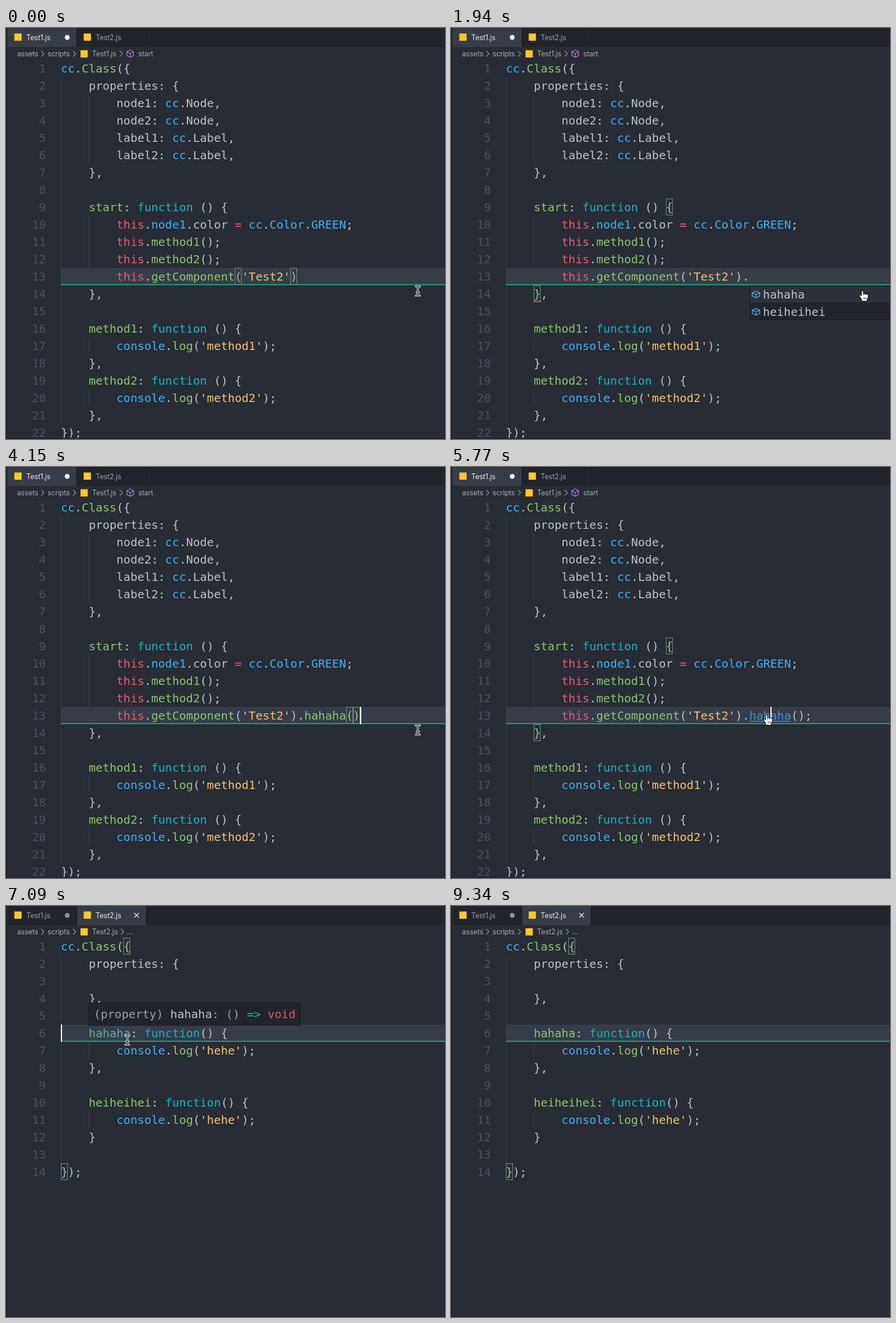
An HTML page with a canvas for the animation above (9.94 s loop, 760x711 px).

```html
<!DOCTYPE html>
<html lang="en">
<head>
<meta charset="utf-8">
<title>Go to definition</title>
<style>
html, body { margin: 0; width: 100%; height: 100%; overflow: hidden; background: #282c34; }
canvas { display: block; width: 760px; height: 711px; }
</style>
</head>
<body>
<canvas id="stage"></canvas>
<script>
const W = 760, H = 711, LOOP = 9940;
const canvas = document.getElementById('stage');
const ctx = canvas.getContext('2d');
const dpr = window.devicePixelRatio || 1;
canvas.width = W * dpr;
canvas.height = H * dpr;

const MONO = '20px "DejaVu Sans Mono", Menlo, monospace';
const UI = '12.5px Inter, sans-serif';
const X0 = 95, TOP = 55, ROW = 30;
ctx.font = MONO;
const CH = ctx.measureText('0').width;

const INK = {
  w: '#bcc0c7', b: '#3fb0f3', g: '#8cc570', t: '#12b5bf',
  p: '#ec5a70', y: '#f0c46f', l: '#3a91d4', d: '#9a9fa7', v: '#d9566c'
};

// Each token is a colour key followed by its text.
const log = s => `b        console|w.|glog|w(|y'${s}'|w);`;
const method = (name, gap) => `g    ${name}|w: |tfunction|w${gap}() {`;
const member = (name, type) => `w        ${name}: |bcc|w.${type},`;
const call = name => `p        this|w.|g${name}|w();`;
const HEAD = ['bcc|w.|gClass|w({', 'w    properties: {'];
const END = 'w    },';

const first = [
  ...HEAD,
  member('node1', 'Node'), member('node2', 'Node'),
  member('label1', 'Label'), member('label2', 'Label'),
  END, '',
  method('start', ' '),
  'p        this|w.|bnode1|w.color |p=|b cc|w.|bColor|w.|bGREEN|w;',
  call('method1'), call('method2'),
  "p        this|w.|ggetComponent|w(|y'Test2'|w)",
  END, '',
  method('method1', ' '), log('method1'), END,
  method('method2', ' '), log('method2'), END,
  'w});'
];
const second = [
  ...HEAD, '', END, '',
  method('hahaha', ''), log('hehe'), END, '',
  method('heiheihei', ''), log('hehe'), 'w    }', '',
  'w});'
];

// Step tracks: [start time, value]
const tail = [[0, ''], [300, '.'], [2230, '.h'], [3120, '.ha'], [3260, '.hahaha'],
  [4150, '.hahaha()'], [4440, '.hahaha();']];
const caret = [[0, -1], [300, 35], [900, -1], [1340, 35], [1940, -1], [2230, 36], [2680, -1],
  [3120, 37], [3260, 41], [3710, -1], [4150, 43], [4890, -1], [5480, 44], [5770, 38],
  [5920, 0], [6360, -1], [6800, 0], [7390, -1], [7840, 0], [8290, -1], [8890, 0], [9340, -1]];
const pairs = [[0, [[13, 25], [13, 33]]], [300, []], [450, [[9, 23], [14, 4]]],
  [4150, [[13, 41], [13, 42]]], [4440, [[9, 23], [14, 4]]], [5920, [[1, 9], [14, 0]]]];
const mouse = [[0, 713, 455], [4890, 692, 438], [5030, 636, 408], [5180, 580, 405],
  [5330, 552, 427], [5480, 549, 436], [5920, 547, 430], [6800, 210, 232],
  [7240, 219, 266], [7390, 228, 292], [8290, 292, 318], [8740, 705, 700]];

const now = (track, t) => track.filter(k => k[0] <= t).pop();
const at = (track, t) => now(track, t)[1];
const rowY = n => TOP + (n - 1) * ROW;
const colX = c => X0 + c * CH;

function rect(x, y, w, h, color) {
  ctx.fillStyle = color;
  ctx.fillRect(x, y, w, h);
}

function text(s, x, y, color, font = MONO, align = 'left') {
  ctx.font = font;
  ctx.letterSpacing = font === UI ? '-0.2px' : '0px';
  ctx.textAlign = align;
  ctx.fillStyle = color;
  ctx.fillText(s, x, y);
}

function stroke(color, width, points) {
  ctx.strokeStyle = color;
  ctx.lineWidth = width;
  ctx.beginPath();
  points.forEach(([x, y], i) => i ? ctx.lineTo(x, y) : ctx.moveTo(x, y));
  ctx.stroke();
}

function tokens(line, x, y) {
  if (!line) return;
  for (const part of line.split('|')) {
    const s = part.slice(1);
    text(s, x, y, INK[part[0]]);
    x += s.length * CH;
  }
}

function panel(x, y, w, h) {
  rect(x, y, w, h, '#181a1f');
  rect(x + 1, y + 1, w - 2, h - 2, '#21252b');
}

const icon = (x, y) => rect(x, y, 12.5, 12.5, '#ffca1f');

function cube(x, y, r, k, color) {
  const h = r * k;
  stroke(color, 1.2, [[x, y - r], [x + h, y - r / 2], [x + h, y + r / 2], [x, y + r],
    [x - h, y + r / 2], [x - h, y - r / 2], [x, y - r]]);
  stroke(color, 1.2, [[x - h, y - r / 2], [x, y], [x + h, y - r / 2]]);
  stroke(color, 1.2, [[x, y], [x, y + r]]);
}

function tab(x, name, active) {
  rect(x, 0, 119, 33, active ? '#363c48' : '#21252b');
  rect(x + 119, 0, 1, 33, '#1a1d22');
  icon(x + 11.5, 9.5);
  text(name, x + 32, 21, active ? '#e6e8eb' : '#959ba6', UI);
}

function header(other) {
  rect(0, 0, W, 33, '#21252b');
  tab(3, 'Test1.js', !other);
  tab(123, 'Test2.js', other);
  ctx.fillStyle = other ? '#8f949d' : '#f2f3f5';
  ctx.beginPath();
  ctx.arc(106, 16.3, 4.2, 0, 7);
  ctx.fill();
  if (other) {
    stroke('#e6e8eb', 1.2, [[222, 12], [230, 20]]);
    stroke('#e6e8eb', 1.2, [[230, 12], [222, 20]]);
  }
  const grey = '#a4aab4';
  text('assets', 19, 49, grey, UI);
  text('scripts', 72, 49, grey, UI);
  icon(129, 38.5);
  text(other ? 'Test2.js' : 'Test1.js', 149, 49, grey, UI);
  for (const x of [61, 116, other ? 199 : 197]) {
    stroke(grey, 1.1, [[x, 39.5], [x + 4.5, 44.5], [x, 49.5]]);
  }
  if (!other) cube(215, 44.3, 6.5, .88, '#b180d7');
  text(other ? '...' : 'start', other ? 209 : 229, 49, grey, UI);
}

function guide(col, from, to) {
  rect(Math.round(colX(col)), rowY(from), 1, (to - from + 1) * ROW, '#3b4049');
}

function editor(lines, current, guides) {
  rect(X0, rowY(current), W - X0, ROW, '#363c48');
  for (const g of guides) guide(...g);
  lines.forEach((line, i) => {
    const y = rowY(i + 1) + 22;
    text(i + 1, 69, y, '#495162', MONO, 'right');
    tokens(line, X0, y);
  });
  rect(X0, rowY(current) + 28, W - X0, 2, '#10a277');
}

function brackets(list) {
  for (const [row, col] of list) {
    const x = Math.round(colX(col)), y = rowY(row);
    ctx.fillStyle = 'rgba(0,100,0,.1)';
    ctx.fillRect(x, y, 12, 30);
    ctx.strokeStyle = '#7e8b85';
    ctx.lineWidth = 1;
    ctx.strokeRect(x + .5, y + .5, 11, 28);
  }
}

function typed(s, link) {
  const y = rowY(13) + 22, name = s.slice(1, 7);
  const done = s.includes('(');
  tokens(`w${s.slice(0, 1)}|${link ? 'l' : done ? 'g' : 'w'}${name}|w${s.slice(7)}`, colX(34), y);
  if (link) rect(colX(35), y + 2, 6 * CH, 1.5, INK.l);
}

function suggestions(prefix) {
  const words = ['hahaha', 'heiheihei'].filter(w => w.startsWith(prefix));
  panel(517, 446, 260, words.length * 29.5);
  rect(518, 447, W - 518, 28, '#2c313a');
  words.forEach((word, i) => {
    const y = 461 + i * ROW;
    cube(528, y, 5.6, 1.15, '#5fb4f0');
    tokens(`b${prefix}|w${word.slice(prefix.length)}`, 540, y + 7);
  });
}

function squiggle() {
  const points = [];
  for (let i = 0; i <= 6; i++) points.push([144 + i * 2, i % 2 ? 471.5 : 474]);
  stroke('#e0483e', 1.3, points);
}

function tooltip() {
  panel(143, 167, 367, 40);
  tokens('d(property) |whahaha|d: () |t=>|d |vvoid', 152, 194);
}

function beam(x, y) {
  const shape = () => {
    ctx.beginPath();
    for (const s of [-1, 1]) {
      ctx.moveTo(x - 3.5, y + 8 * s);
      ctx.quadraticCurveTo(x, y + 8 * s, x, y + 5 * s);
      ctx.quadraticCurveTo(x, y + 8 * s, x + 3.5, y + 8 * s);
    }
    ctx.moveTo(x, y - 6);
    ctx.lineTo(x, y + 6);
    ctx.moveTo(x - 2, y + 2.5);
    ctx.lineTo(x + 2, y + 2.5);
    ctx.stroke();
  };
  ctx.lineCap = 'round';
  ctx.strokeStyle = '#f4f4f4';
  ctx.lineWidth = 3.2;
  shape();
  ctx.strokeStyle = '#15171a';
  ctx.lineWidth = 1.2;
  shape();
  ctx.lineCap = 'butt';
}

const palm = new Path2D('M-2.5 2V-6.2C-2.5-8.3-5-8.3-5-6.2V1.5L-6.2 0C-7.5-1-9 0-8 1.6' +
  'L-4.5 6.8V9H4V6.5C5.5 4 6 2 6-.5C6-2.4 3.8-2.4 3.6-.8C3.6-3 1.2-3 1-1.2C.8-3.4-1.8-3.2-2-1.4Z');

function hand(x, y) {
  ctx.save();
  ctx.translate(x + 1, y);
  ctx.lineJoin = 'round';
  ctx.strokeStyle = '#0c0d0f';
  ctx.lineWidth = 2;
  ctx.stroke(palm);
  ctx.fillStyle = '#fff';
  ctx.fill(palm);
  for (const i of [-1.2, .9, 3]) stroke('#222', .8, [[i, 3], [i, 6.5]]);
  ctx.restore();
}

function pointer(t) {
  if (t >= 8890) return;
  let [start, x, y] = now(mouse, t);
  // Longer travels advance in ticks of about 147 ms.
  const travel = (from, to, ease) => {
    const next = mouse.find(k => k[0] === to);
    const n = Math.round((to - from) / 147);
    const k = ease(Math.floor((t - from + 6) / 147) / n);
    x += (next[1] - x) * k;
    y += (next[2] - y) * k;
  };
  if (start === 5920) travel(5920, 6800, k => k * k * (3 - 2 * k));
  if (start === 8290) travel(8290, 8740, k => k * k);
  const pointing = (t >= 450 && t < 3710) || (t >= 5480 && t < 5920);
  if (!pointing) beam(x, y);
  else if (t < 3710) hand(715, 463);
  else hand(x, y + 1);
}

function draw(t) {
  const other = t >= 5920;
  ctx.setTransform(dpr, 0, 0, dpr, 0, 0);
  rect(0, 0, W, H, '#282c34');
  header(other);
  if (other) {
    editor(second, 6, [[0, 2, 13], [4, 7, 7], [4, 11, 11]]);
  } else {
    editor(first, 13, [[0, 2, 21], [4, 3, 6], [4, 10, 13], [4, 17, 17], [4, 20, 20]]);
    typed(at(tail, t), t >= 5480);
  }
  brackets(at(pairs, t));
  if (t >= 750 && t < 2530) squiggle();
  if (t >= 450 && t < 3260) suggestions(at(tail, t).slice(1));
  if (t >= 7090 && t < 7240) {
    ctx.fillStyle = 'rgba(38,79,120,.25)';
    ctx.fillRect(colX(4), rowY(6), 6 * CH, 28);
    tooltip();
  }
  const col = at(caret, t);
  if (col >= 0) rect(Math.round(colX(col)), rowY(other ? 6 : 13), 2, ROW, '#fff');
  rect(0, 0, 3, H, '#23272e');
  rect(0, 709, W, 2, '#21252b');
  pointer(t);
}

const begin = performance.now();
function tick() {
  draw((performance.now() - begin) % LOOP);
  requestAnimationFrame(tick);
}
tick();
</script>
</body>
</html>
```
